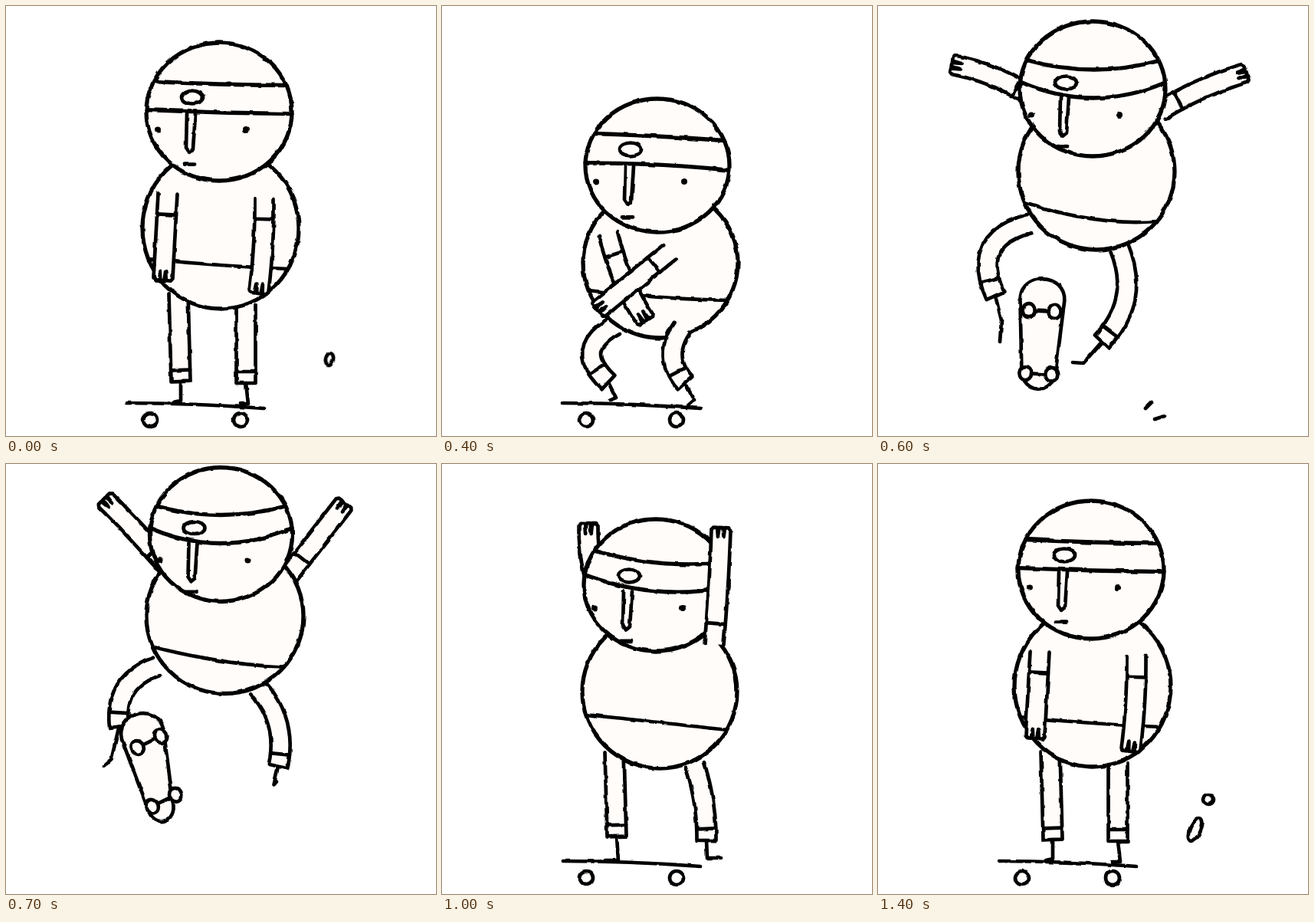
These frames come from a looping animation (561x561 px, 1.5 s). An HTML page:

```html
<!DOCTYPE html>
<html lang="en">
<head>
<meta charset="utf-8">
<title>Skater</title>
<style>
html, body { margin: 0; height: 100%; overflow: hidden; background: #fff; }
svg { display: block; width: 100vw; height: 100vh; }
#art { fill: none; stroke: #000; stroke-width: 4.7; stroke-linecap: round; stroke-linejoin: round; }
#art .skin { fill: #fffcfa; }
#art .bold { stroke-width: 5.3; }
#art .dot { fill: #000; stroke: none; }
</style>
</head>
<body>
<svg viewBox="0 0 561 561">
  <filter id="rough" filterUnits="userSpaceOnUse" x="0" y="0" width="561" height="561" color-interpolation-filters="sRGB">
    <feTurbulence id="noise" type="fractalNoise" baseFrequency=".07" numOctaves="2"/>
    <feDisplacementMap in="SourceGraphic" scale="3.5" xChannelSelector="R" yChannelSelector="G"/>
  </filter>
  <g filter="url(#rough)"><g id="art"></g></g>
</svg>
<script>
// head, body: centre and radii      look: nod down, tilt      hem: height at left, middle, right
// arms: shoulder, hand, elbow bend  legs: hip, ankle, knee bend, heel, toe
// board: centre and angle; seen from below also half widths at both ends and axle shift
// back: limbs drawn behind the body
const ground = [248, 521, 0];
const stand = {
  head: [278, 138, 95, 90], look: [1, 5], body: [280, 290, 102, 105], hem: [40, 48, 53],
  armL: [211, 245, 205, 355, 0], armR: [337, 251, 330, 372, -2],
  legL: [225, 375, 228, 490, 0, 228, 515, 219, 517], legR: [313, 390, 313, 492, 0, 316, 519, 306, 519],
  board: ground, back: 'legL legR'
};
const crouch = {
  head: [281, 208, 94, 87], look: [-1, 9], body: [285, 335, 101, 98], hem: [36, 45, 49],
  armL: [217, 298, 264, 408, 5], armR: [297, 321, 205, 395, 0],
  legL: [226, 417, 217, 491, 26, 227, 511, 219, 514], legR: [313, 420, 317, 492, 14, 329, 514, 320, 522],
  board: ground, back: 'legL'
};
const leap = {
  head: [280, 108, 95, 88], look: [12, 1], body: [285, 216, 102, 102], hem: [40, 62, 65],
  armL: [204, 121, 99, 77, 6], armR: [368, 137, 478, 88, -4],
  legL: [198, 284, 153, 378, 31, 161, 410, 159, 438], legR: [315, 316, 292, 438, -20, 268, 466, 254, 465],
  board: [212, 428, 3, 29, 22, 0], back: 'armL armR legL legR'
};
const float = {
  head: [281, 106, 91, 87], look: [11, -1], body: [286, 211, 103, 100], hem: [40, 55, 67],
  armL: [217, 176, 161, 48, -4], armR: [371, 182, 403, 48, 4],
  legL: [194, 275, 142, 337, 6, 114, 390, 97, 379], legR: [342, 298, 418, 381, -7, 431, 401, 452, 394],
  board: [166, 394, -31, 27, 12, 12], back: 'armL armR legL legR'
};
const touchdown = {
  head: [279, 158, 94, 86], look: [8, 16], body: [284, 297, 101, 100], hem: [30, 40, 50],
  armL: [206, 172, 191, 81, -4], armR: [355, 235, 364, 86, 1],
  legL: [225, 376, 228, 486, 0, 230, 517, 213, 517], legR: [330, 393, 345, 491, -4, 346, 514, 363, 514],
  board: ground, back: 'armL legL legR'
};
const absorb = {
  head: [278, 208, 93, 89], look: [8, 5], body: [285, 328, 102, 97], hem: [36, 53, 44],
  armL: [203, 280, 153, 375, -10], armR: [354, 285, 395, 369, 10],
  legL: [215, 405, 220, 491, 17, 230, 515, 218, 517], legR: [312, 412, 314, 496, 9, 317, 522, 306, 523],
  board: ground, back: 'legL'
};

// Blend two poses; parts of different kinds switch halfway.
function mix(a, b, k, changes) {
  const pose = {};
  for (const key in a) {
    const p = a[key], q = b[key];
    pose[key] = Array.isArray(p) && p.length === q?.length
      ? p.map((v, i) => v + (q[i] - v) * k) : k < .5 ? p : q;
  }
  return { ...pose, ...changes };
}

const line = (points, cls = '') => `<path class="${cls}" d="M${points}"/>`;
const oval = ([x, y, rx, ry], cls = 'skin', turn = 0) =>
  `<ellipse class="${cls}" cx="${x}" cy="${y}" rx="${rx}" ry="${ry}" transform="rotate(${turn} ${x} ${y})"/>`;

// Curve across an oval through three heights measured from its centre.
function band([x, y, rx, ry], left, middle, right, cls) {
  const half = h => rx * Math.sqrt(1 - (h / ry) ** 2);
  return line(`${x - half(left)},${y + left}Q${x},${y + 2 * middle - (left + right) / 2} ${x + half(right)},${y + right}`, cls);
}

function limb([x0, y0, x1, y1, bend, ...foot]) {
  const width = 25, dx = x1 - x0, dy = y1 - y0, length = Math.hypot(dx, dy);
  // Point at t along the limb, u widths across it and v pixels further on.
  const at = (t, u, v = 0) => {
    const bow = 4 * t * (1 - t) * bend, slope = 4 * (1 - 2 * t) * bend / length, n = Math.hypot(1, slope);
    const along = t * length + (v - u * width * slope) / n, across = bow + (v * slope + u * width) / n;
    return [x0 + (along * dx - across * dy) / length, y0 + (along * dy + across * dx) / length];
  };
  const side = u => Array.from({ length: 13 }, (_, i) => at(i / 12, u));
  const fingers = foot.length ? [] : [-.3, 0, .3].flatMap(u =>
    [at(1, u - .15, -9), at(1, u - .1, 3), at(1, u + .1, 3)]).slice(1);
  const cuff = foot.length ? 1 - 15 / length : 27 / length;
  return line([...side(-.5), ...fingers, ...side(.5).reverse()], 'skin')
    + line([at(cuff, -.5), at(cuff, .5)]) + (foot.length ? line([x1, y1, ...foot]) : '');
}

function skateboard([x, y, angle, top, tail, shift]) {
  const side = () => line('-90,-3Q-5,-3 89,4') + oval([-60, 19, 9, 9]) + oval([58, 19, 9, 9]);
  const truck = at => `<g transform="translate(${shift} ${at}) rotate(${-2 * shift})">`
    + line([-17, 0, 17, 0]) + oval([-17, 0, 8, 9]) + oval([17, 0, 8, 9]) + '</g>';
  const below = () => line(`${-top},-45C${-top},-81 ${top},-81 ${top},-45L${tail},50C${tail},79 ${-tail},79 ${-tail},50Z`, 'skin')
    + truck(-30 - shift / 2) + truck(52 - shift);
  return `<g transform="translate(${x} ${y}) rotate(${angle})">${top ? below() : side()}</g>`;
}

function face(head, [nod, tilt]) {
  const [x, y] = head, half = tilt / 2, top = 2 + nod * .8;
  return band(head, -37 - half, nod - 37, -37 + half, 'bold')
    + band(head, 1 - nod * .8 - half, nod, 1 - nod * .8 + half, 'bold')
    + `<g transform="translate(${x} ${y})">`
    + oval([-35, nod - 20, 14, 8.5])
    + line([-42, top, -43, top + 44, -39, top + 50, -34, top + 46, -31, top], 'skin')
    + oval([-80, 22 + nod, 4, 3.6], 'dot') + oval([35, 22 + nod, 4, 4], 'dot')
    + line([-46, 68 + nod * .6, -32, 68 + nod * .6]) + '</g>';
}

function draw(pose) {
  const limbs = behind => ['legL', 'legR', 'armL', 'armR']
    .filter(name => pose.back.includes(name) === behind).map(name => limb(pose[name])).join('');
  return limbs(true) + oval(pose.body, 'skin bold') + band(pose.body, ...pose.hem)
    + oval(pose.head, 'skin bold') + face(pose.head, pose.look) + limbs(false) + skateboard(pose.board);
}

// Key poses by step; steps between them are eased.
const keys = {
  0: stand,
  4: crouch,
  5: mix(crouch, leap, .5, {
    armL: [200, 240, 115, 182, 8], armR: [372, 240, 455, 185, -8], board: [228, 500, 22], back: leap.back
  }),
  6: leap,
  7: mix(leap, float, .5, { lift: 15 }),
  8: float,
  9: mix(float, touchdown, .5, { board: [235, 468, 2] }),
  10: touchdown,
  11: mix(touchdown, absorb, .5, {
    armL: [205, 258, 128, 255, 4], armR: [365, 258, 440, 255, -4], back: 'armL armR legL'
  }),
  12: absorb,
  13: mix(absorb, stand, 1.13),
  14: stand
};
const dust = {
  0: oval([422, 461, 5, 8], 'skin', 12),
  5: line([335, 545, 345, 537]) + line([344, 556, 358, 553]),
  6: line([349, 525, 357, 517]) + line([361, 539, 374, 535]),
  12: line('365,522Q371,486 385,487C402,484 397,496 393,504C412,502 406,521 402,524Q385,531 367,528Z', 'skin') + oval([409, 473, 5, 6]),
  13: oval([403, 494, 12, 18], 'skin', 25) + oval([420, 454, 6, 6]),
  14: oval([414, 477, 7, 16], 'skin', 25) + oval([431, 438, 7, 6])
};
const times = Object.keys(keys).map(Number);
const ease = k => (1 - Math.cos(Math.PI * k)) / 2;

function poseAt(step) {
  if (keys[step]) return keys[step];
  const next = times.find(t => t > step), last = times[times.indexOf(next) - 1];
  return mix(keys[last], keys[next], ease((step - last) / (next - last)));
}

const art = document.getElementById('art'), noise = document.getElementById('noise');
let shown = -1;
function tick() {
  const step = Math.floor(performance.now() % 1500 / 100);
  if (step !== shown) {
    shown = step;
    const pose = poseAt(step);
    noise.setAttribute('seed', step + 1);
    art.setAttribute('transform', `translate(0 ${-(pose.lift || 0)})`);
    art.innerHTML = draw(pose) + (dust[step] || '');
  }
  requestAnimationFrame(tick);
}
tick();
</script>
</body>
</html>
```
